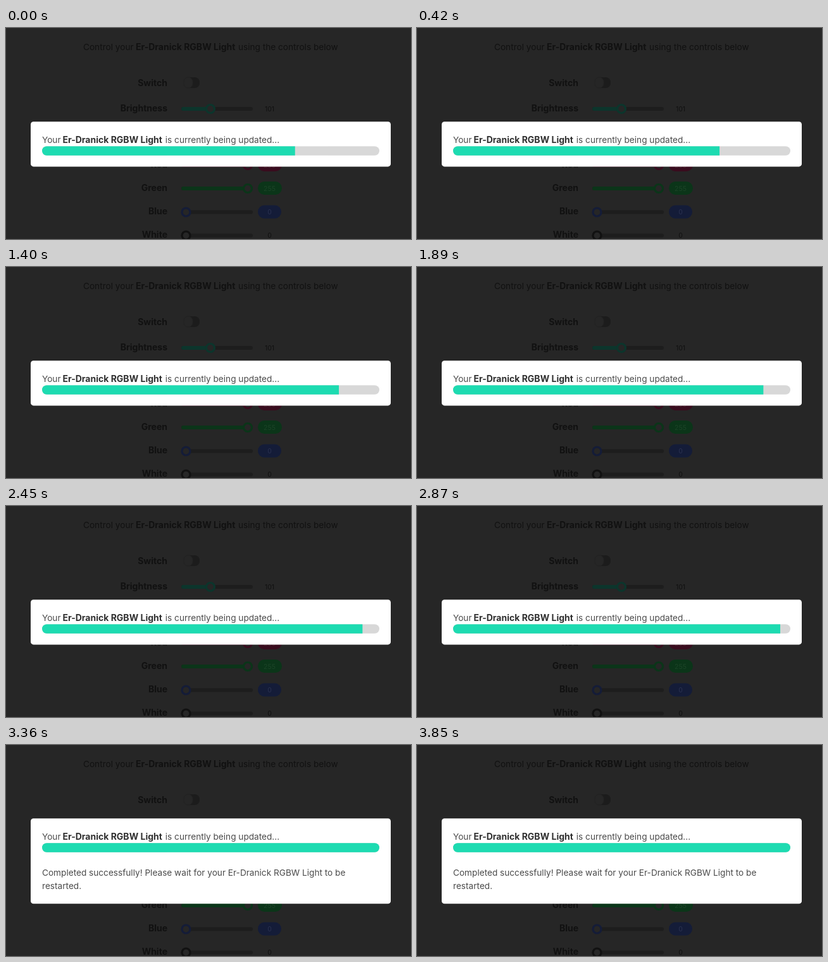
Write an HTML page that moves like this. It is 640 by 334 pixels and loops after 4.83 s.

```html
<!DOCTYPE html>
<html lang="en">
<head>
<meta charset="utf-8">
<title>Device update</title>
<style>
  html, body { margin: 0; width: 100%; height: 100%; overflow: hidden; background: #262626; }
  svg { display: block; width: 100%; height: 100%; }
  text { font: 13.63px Inter, "Open Sans", sans-serif; white-space: pre; }
  .bold { font-size: 14px; font-weight: 700; }
  .value { font-size: 10.5px; text-anchor: middle; }
  .label { text-anchor: end; }
  #page { fill: #111; }
  #modal { fill: #4a4a4a; }
  #modal .bold { fill: #303030; }
</style>
</head>
<body>
<svg viewBox="0 0 640 334">
  <defs>
    <clipPath id="barShape"><rect x="57" y="187.2" width="533" height="14.6" rx="7.3"/></clipPath>
  </defs>

  <g id="page">
    <text x="122" y="35">Control your</text>
    <text class="bold" x="205" y="35">Er-Dranick RGBW Light</text>
    <text x="367" y="35">using the controls below</text>
    <text class="bold label" x="255" y="92.3">Switch</text>
    <rect x="281" y="78" width="25" height="17" rx="8" fill="#1c1c1c"/>
    <rect x="281" y="78" width="14" height="17" rx="7" fill="#262626" stroke="#222"/>
    <g id="sliders"></g>
  </g>

  <g id="modal">
    <rect id="panel" x="39" width="569" rx="4.4" fill="#fff"/>
    <g id="progress">
      <text x="57" y="182">Your</text>
      <text class="bold" x="89.5" y="182">Er-Dranick RGBW Light</text>
      <text x="251.8" y="182">is currently being updated...</text>
      <g clip-path="url(#barShape)">
        <rect x="57" y="187" width="533" height="15" fill="#d8d8d8"/>
        <rect id="fill" x="57" y="187" height="15" fill="#1ddbb1"/>
      </g>
    </g>
    <g id="message">
      <text x="57" y="207">Completed successfully! Please wait for your Er-Dranick RGBW Light to be</text>
      <text x="57" y="228">restarted.</text>
    </g>
  </g>
</svg>

<script>
const LOOP = 4830, DONE = 3360, BAR_WIDTH = 533;
const $ = id => document.getElementById(id);

// Reported percentage at given times in ms
const reports = [[0, 75], [560, 81], [910, 85], [1120, 86], [1680, 91], [1890, 92],
                 [2240, 93], [2450, 95], [2800, 97], [3290, 99], [DONE, 100]];

function percentAt(t) {
  if (t >= DONE) return 100;
  const next = reports.findIndex(([time]) => time > t);
  const [t0, p0] = reports[next - 1], [t1, p1] = reports[next];
  return Math.floor(p0 + (p1 - p0) * (t - t0) / (t1 - t0) + 1e-6);
}

function slider(name, y, knobX, value, color, pillWidth = 0, valueColor = "#111") {
  return `
    <text class="bold label" x="255" y="${y + 4.2}">${name}</text>
    <rect x="277" y="${y - 2.5}" width="113" height="6" rx="3" fill="#1d1d1d"/>
    <rect x="277" y="${y - 2.5}" width="${knobX - 277}" height="6" rx="3" fill="${color}"/>
    <circle cx="${knobX}" cy="${y + 0.5}" r="6.5" fill="#262626" stroke="${color}" stroke-width="3.2"/>
    <rect x="398" y="${y - 10.5}" width="${pillWidth}" height="21" rx="10.5" fill="${color}"/>
    <text class="value" x="416.5" y="${y + 4}" fill="${valueColor}">${value}</text>`;
}

$("sliders").innerHTML =
  slider("Brightness", 127.5, 323, 101, "#0c352c") +
  slider("Red", 216.5, 382, 255, "#390c1e", 38, "#4a2430") +
  slider("Green", 253.5, 382, 255, "#0b3519", 38, "#1c4428") +
  slider("Blue", 291, 284.5, 0, "#141c38", 37, "#2a3150") +
  slider("White", 328, 284.5, 0, "#111");

function draw(now) {
  const t = now % LOOP, done = t >= DONE;
  $("panel").setAttribute("y", done ? 116.3 : 148.3);
  $("panel").setAttribute("height", done ? 135 : 71.1);
  $("progress").setAttribute("transform", `translate(0 ${done ? -32 : 0})`);
  $("message").style.display = done ? "" : "none";
  $("fill").setAttribute("width", BAR_WIDTH * percentAt(t) / 100);
}

const start = performance.now();
function tick() {
  draw(performance.now() - start);
  requestAnimationFrame(tick);
}
tick();
</script>
</body>
</html>
```
